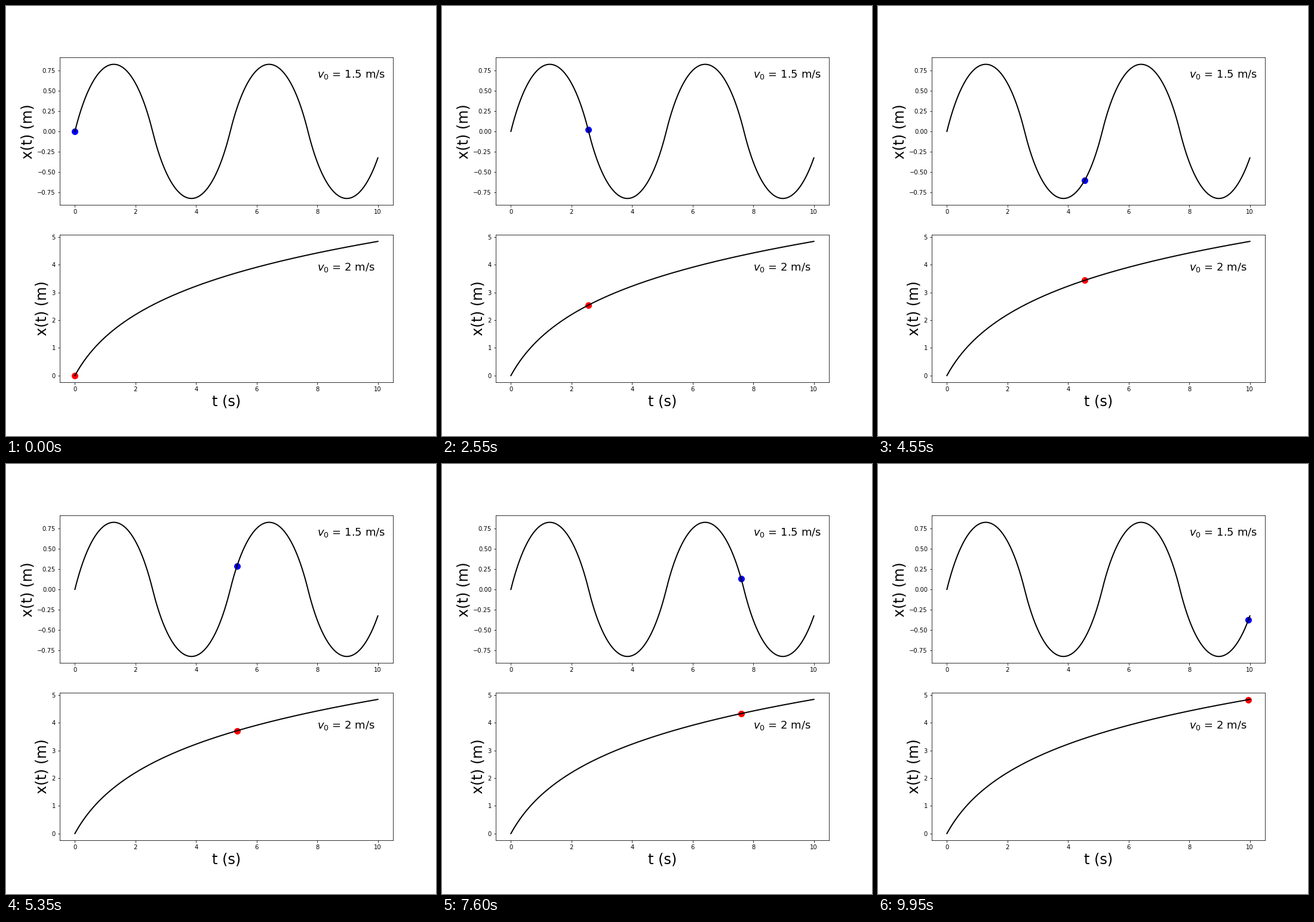
Recreate the animation shown at these times as a matplotlib script. Size 720 by 720 pixels, loop 10000 ms.

```python
import numpy as np
import matplotlib.pyplot as plt
from matplotlib.animation import FuncAnimation

# Motion under the force -2 sgn(x) exp(-|x|), solved in closed form.
FRAMES, INTERVAL = 200, 50
EXCESS = 0.005  # tiny surplus of v0^2 over the escape value of 4


def bound(t, v0=1.5):
    """Oscillation below the escape speed."""
    k = np.sqrt(4 - v0**2)
    quarter = 2 / k * np.arctan(v0 / k)
    half = np.floor(t / (2 * quarter))
    v = k * np.tan(k / 2 * (quarter - (t - 2 * quarter * half)))
    return (-1) ** half * np.log(4 / (k**2 + v**2))


def escaping(t):
    """Outward flight just at the escape speed."""
    r = np.sqrt(EXCESS)
    return 2 * np.log(2 / r * np.sinh(r * t / 2 + np.arcsinh(r / 2)))


def draw_panel(ax, path, color, label, label_y):
    dot, = ax.plot([0], [0], "o", color=color, markersize=10)
    ax.plot(times, path(times), color="black", lw=2)
    ax.text(8, label_y, label, fontsize=18)
    ax.set_ylabel("x(t) (m)", fontsize=24)
    return dot


plt.rcParams["font.family"] = "DejaVu Sans"
times = np.linspace(0, 10, FRAMES + 1)

fig, (top, bottom) = plt.subplots(2, 1, figsize=(10, 10), dpi=72)
fig.subplots_adjust(left=0.125, right=0.9, bottom=0.125, top=0.88, hspace=0.2)

paths = (bound, escaping)
dots = (
    draw_panel(top, bound, "blue", "$v_0$ = 1.5 m/s", 0.66),
    draw_panel(bottom, escaping, "red", "$v_0$ = 2 m/s", 3.8),
)
bottom.set_xlabel("t (s)", fontsize=24)


def update(i):
    t = times[i]
    for dot, path in zip(dots, paths):
        dot.set_data([t], [path(t)])
    return dots


anim = FuncAnimation(fig, update, frames=FRAMES, interval=INTERVAL,
                     repeat=True, repeat_delay=0)
plt.show()
```
